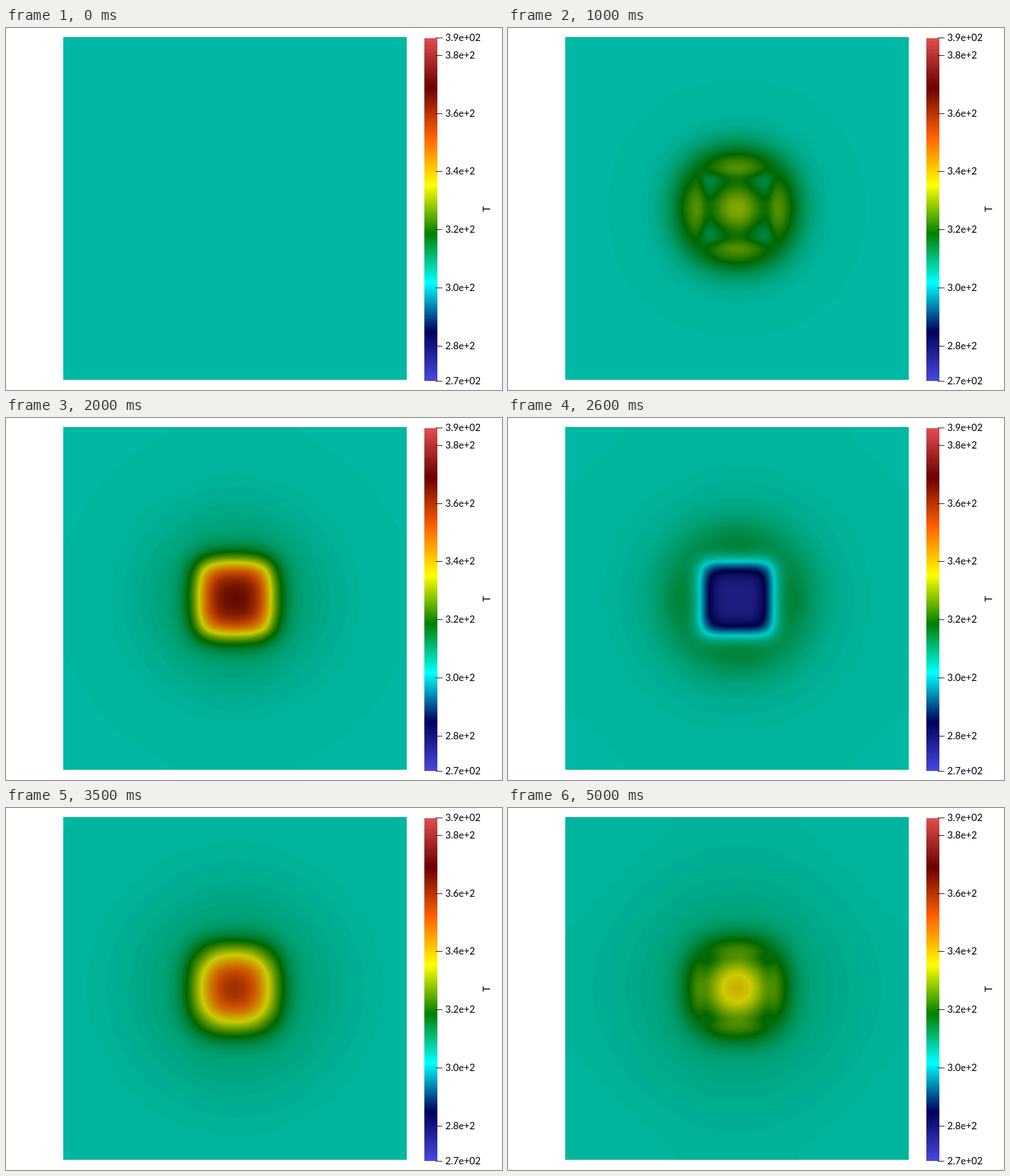
An HTML page with a canvas for the animation above (5100 ms loop, 875 by 640 pixels).

```html
<!DOCTYPE html>
<html>
<head>
<meta charset="utf-8">
<style>
  html, body { margin: 0; width: 100%; height: 100%; overflow: hidden; background: #fff; }
  canvas { display: block; }
</style>
</head>
<body>
<canvas id="stage" width="875" height="640"></canvas>
<script>
const ctx = document.getElementById('stage').getContext('2d');

// Heat equation on an insulated square with an oscillating square heater.
const FRAMES = 51, FRAME_MS = 100, SUBSTEPS = 4;
const HALF = 303, SIZE = HALF * 2, LEFT = 101, TOP = 16;
const HEATER = 60.5, DIFFUSION = 144, POWER = 19.6, OMEGA = 0.457;
const T_MIN = 267.9, T_SPAN = 118.1, SHADE = 0.8;
const T_START = T_MIN + T_SPAN * 81 / 256 - 0.01;

const STOPS = [
  [0, .278, .278, .859], [.143, 0, 0, .361], [.285, 0, 1, 1], [.429, 0, .502, 0],
  [.571, 1, 1, 0], [.714, 1, .38, 0], [.857, .42, 0, 0], [1, .878, .302, .302]
];

function rainbow(v) {
  let i = 1;
  while (i < STOPS.length - 1 && v > STOPS[i][0]) i++;
  const a = STOPS[i - 1], b = STOPS[i], f = (v - a[0]) / (b[0] - a[0]);
  return [1, 2, 3].map(c => 255 * (a[c] + (b[c] - a[c]) * f));
}

const palette = Array.from({ length: 256 }, (_, i) => rainbow(i / 255));
const shaded = Uint32Array.from(palette, rgb => {
  const [r, g, b] = rgb.map(c => Math.round(c * SHADE));
  return (255 << 24 | b << 16 | g << 8 | r) >>> 0;
});
const level = v => Math.max(0, Math.min(255, Math.floor(v * 256)));

function erf(x) {
  const z = Math.abs(x), t = 1 / (1 + 0.3275911 * z);
  const p = t * (0.254829592 + t * (-0.284496736 + t * (1.421413741 + t * (-1.453152027 + t * 1.061405429))));
  return Math.sign(x) * (1 - p * Math.exp(-z * z));
}

// Spread of a unit strip of given age, mirrored at the walls.
function spread(age) {
  const len = Math.sqrt(4 * DIFFUSION * age);
  const strip = x => (erf((x + HEATER) / len) - erf((x - HEATER) / len)) / 2;
  return Float32Array.from({ length: HALF }, (_, i) => {
    const x = i + 0.5;
    return strip(x) + strip(SIZE - x) + strip(SIZE + x);
  });
}

const spreads = Array.from({ length: (FRAMES - 1) * SUBSTEPS }, (_, k) => spread((k + 0.5) / SUBSTEPS));
const field = new Float32Array(HALF * HALF);
const image = ctx.createImageData(SIZE, SIZE);
const pixels = new Uint32Array(image.data.buffer);

function drawField(step) {
  field.fill(T_START);
  for (let k = 0; k < step * SUBSTEPS; k++) {
    const g = spreads[k];
    const heat = POWER / SUBSTEPS * Math.sin(OMEGA * (step - (k + 0.5) / SUBSTEPS));
    for (let y = 0; y < HALF; y++) {
      const row = heat * g[y], base = y * HALF;
      for (let x = 0; x <= y; x++) field[base + x] += row * g[x];
    }
  }
  for (let y = 0; y < HALF; y++) {
    for (let x = 0; x <= y; x++) {
      const color = shaded[level((field[y * HALF + x] - T_MIN) / T_SPAN)];
      for (const [u, v] of [[x, y], [y, x]]) {
        const up = (HALF - 1 - v) * SIZE, down = (HALF + v) * SIZE;
        const l = HALF - 1 - u, r = HALF + u;
        pixels[up + l] = pixels[up + r] = pixels[down + l] = pixels[down + r] = color;
      }
    }
  }
  ctx.putImageData(image, LEFT, TOP);
}

function drawLegend() {
  const top = 18, height = 606;
  for (let y = 0; y < height; y++) {
    ctx.fillStyle = `rgb(${palette[level(1 - (y + 0.5) / height)].map(Math.round)})`;
    ctx.fillRect(738, top + y, 23, 1);
  }
  ctx.fillStyle = '#000';
  ctx.font = '17px Lato, sans-serif';
  const label = (text, y) => {
    ctx.fillRect(758, y, 12, 1);
    ctx.fillText(text, 775, y + 6);
  };
  label('3.9e+02', 17);
  for (let i = 0; i < 6; i++) label(`3.${8 - 2 * i}e+2`.replace('3.-2', '2.8'), Math.round(48 + i * 102.7));
  label('2.7e+02', 624);
  ctx.translate(854, 320);
  ctx.rotate(-Math.PI / 2);
  ctx.textAlign = 'center';
  ctx.fillText('T', 0, 0);
  ctx.setTransform(1, 0, 0, 1, 0, 0);
}

ctx.fillStyle = '#fff';
ctx.fillRect(0, 0, 875, 640);
drawLegend();

let shown = -1;
const start = performance.now();
function tick() {
  const step = Math.floor((performance.now() - start) / FRAME_MS) % FRAMES;
  if (step !== shown) drawField(shown = step);
  requestAnimationFrame(tick);
}
tick();
</script>
</body>
</html>
```
